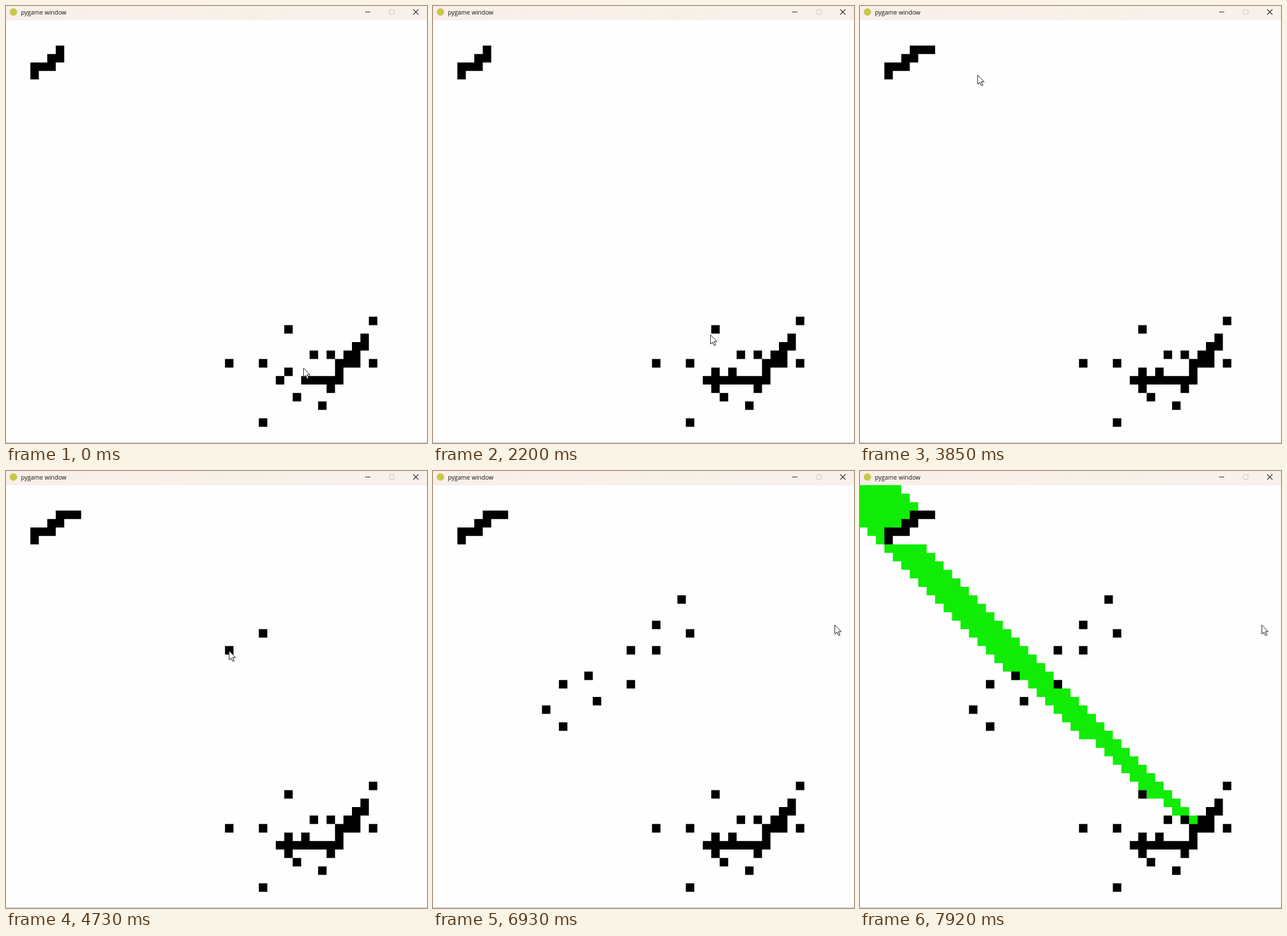
An HTML page with a canvas that plays this animation: 735 px wide and 762 px high, repeating every 8000 ms.

```html
<!DOCTYPE html>
<html lang="en">
<head>
<meta charset="utf-8">
<title>pygame window</title>
<style>
  html, body { margin: 0; width: 100%; height: 100%; overflow: hidden; background: #fff; }
  #stage { position: relative; width: 735px; height: 762px; overflow: hidden; background: #fefefe; }
  canvas, svg { position: absolute; left: 0; top: 0; }
  #bar {
    position: absolute; inset: 0 0 auto; height: 25px;
    background: linear-gradient(90deg, #f9efea, #f8f0e9 45%, #f6f1e7 58%, #f8f0ea 72%, #f9f0eb);
  }
  #title { font: 10.5px "Open Sans", "Noto Sans", sans-serif; fill: #111; }
</style>
</head>
<body>
<div id="stage">
  <div id="bar"></div>
  <canvas id="grid" width="735" height="762"></canvas>
  <svg width="735" height="762" fill="none">
    <circle cx="13" cy="10.5" r="6.5" fill="#c9c64a"/>
    <text id="title" x="26" y="15">pygame window</text>
    <path d="M627 10.5h9" stroke="#222"/>
    <rect x="669.5" y="6.5" width="8" height="8" rx="1" stroke="#c9c2be"/>
    <path d="M711 6l9 9m0-9l-9 9" stroke="#222" stroke-width="1.1"/>
    <path d="M0 761.5h735" stroke="#c4c4c4"/>
    <g id="cursor">
      <path d="M2 2v16l4-3.5 2.6 6 2.6-1.2-2.6-5.8h5.4z" fill="#000" opacity=".18"/>
      <path d="M.5.5v15.8l3.6-3.3 2.6 5.8 2.5-1.1-2.6-5.7h4.9z" fill="#fff" stroke="#222" stroke-linejoin="round"/>
    </g>
  </svg>
</div>
<script>
const LOOP = 8000, STEP = 110, CELL = 14.775;
const GOAL = 50, SEARCH_START = 7480, SEARCH_TIME = 440;
const ctx = document.getElementById('grid').getContext('2d');
const cursor = document.getElementById('cursor');

const toX = col => col * CELL - 1.8;
const toY = row => row * CELL + 24.6;

// Cells along straight segments between corner points.
function stroke(...corners) {
  return corners.slice(1).flatMap(([c1, r1], i) => {
    const [c0, r0] = corners[i];
    const n = Math.abs(c1 - c0) + Math.abs(r1 - r0);
    return Array.from({ length: n + 1 }, (_, k) => [c0 + (c1 - c0) * k / n, r0 + (r1 - r0) * k / n]);
  });
}

const walls = [
  ...stroke([3, 6], [3, 5], [5, 5], [5, 4], [6, 4], [6, 3]),
  ...stroke([35, 42], [39, 42], [39, 40], [41, 40], [41, 38], [42, 38], [42, 37]),
  [43, 35], [33, 36], [36, 39], [38, 39], [40, 39], [26, 40], [30, 40],
  [43, 40], [33, 41], [32, 42], [38, 43], [34, 44], [37, 45], [30, 47]
];

// Pointer stops in grid units; a click draws the cell under the pointer.
const stops = [];
const move = (time, col, row) => stops.push({ time, col, row });
const click = (time, col, row) => stops.push({ time, col, row, draws: true });

move(0, 35.25, 41.05);
click(220, 35.25, 41.1);
click(770, 34.4, 42.2);
move(990, 34.4, 43);
click(1320, 33.75, 43.02);
move(1540, 33.75, 43.02);
move(1760, 35.2, 43.7);
click(1980, 33.5, 42.5);
move(2420, 32.2, 31.8);
move(2860, 7.36, 3.75);
click(2970, 7.5, 3.6);
click(3190, 8.3, 3.5);
move(3300, 8.3, 3.5);
move(4180, 17.4, 8.2);
// A steady loop of clicks out along one side and back along the other.
[[30, 17], [26, 19], [23, 23], [19, 25], [13, 26], [15, 28],
 [15, 23], [18, 22], [23, 19], [26, 16], [29, 13]]
  .forEach(([col, row], i) => click(4520 + i * 195, col + 0.7, row + 0.2));
move(6930, 47.6, 16.48);

// The search fills a diamond at the corner, then a beam narrowing toward the goal.
const visited = [];
for (let row = 0; row < 40; row++) {
  const lag = Math.min(4, Math.floor((GOAL - row) / 7));
  const last = row < 7 ? Math.min(row + 4, 8 - row) : row;
  for (let col = Math.max(0, row - lag); col <= last; col++) visited.push([col, row]);
}

function fillCells(cells, color) {
  ctx.fillStyle = color;
  ctx.beginPath();
  cells.forEach(([col, row]) => ctx.rect(toX(col), toY(row), CELL, CELL));
  ctx.fill();
}

function pointerAt(t) {
  const i = stops.findIndex(s => s.time > t);
  if (i < 0) return stops[stops.length - 1];
  const a = stops[i - 1], b = stops[i];
  const k = (t - a.time) / (b.time - a.time);
  return { col: a.col + (b.col - a.col) * k, row: a.row + (b.row - a.row) * k };
}

function render(time) {
  const t = Math.floor(time / STEP) * STEP;
  const progress = Math.max(0, Math.min(1, (t - SEARCH_START) / SEARCH_TIME));
  const drawn = stops.filter(s => s.draws && s.time <= t)
    .map(s => [Math.floor(s.col), Math.floor(s.row)]);

  ctx.clearRect(0, 0, 735, 762);
  fillCells(visited.slice(0, Math.round(visited.length * progress)), '#10ec06');
  fillCells([...walls, ...drawn], '#000');

  const { col, row } = pointerAt(t);
  cursor.setAttribute('transform', `translate(${Math.round(toX(col))} ${Math.round(toY(row))})`);
}

const start = performance.now();
function tick() {
  render((performance.now() - start) % LOOP);
  requestAnimationFrame(tick);
}
tick();
</script>
</body>
</html>
```
